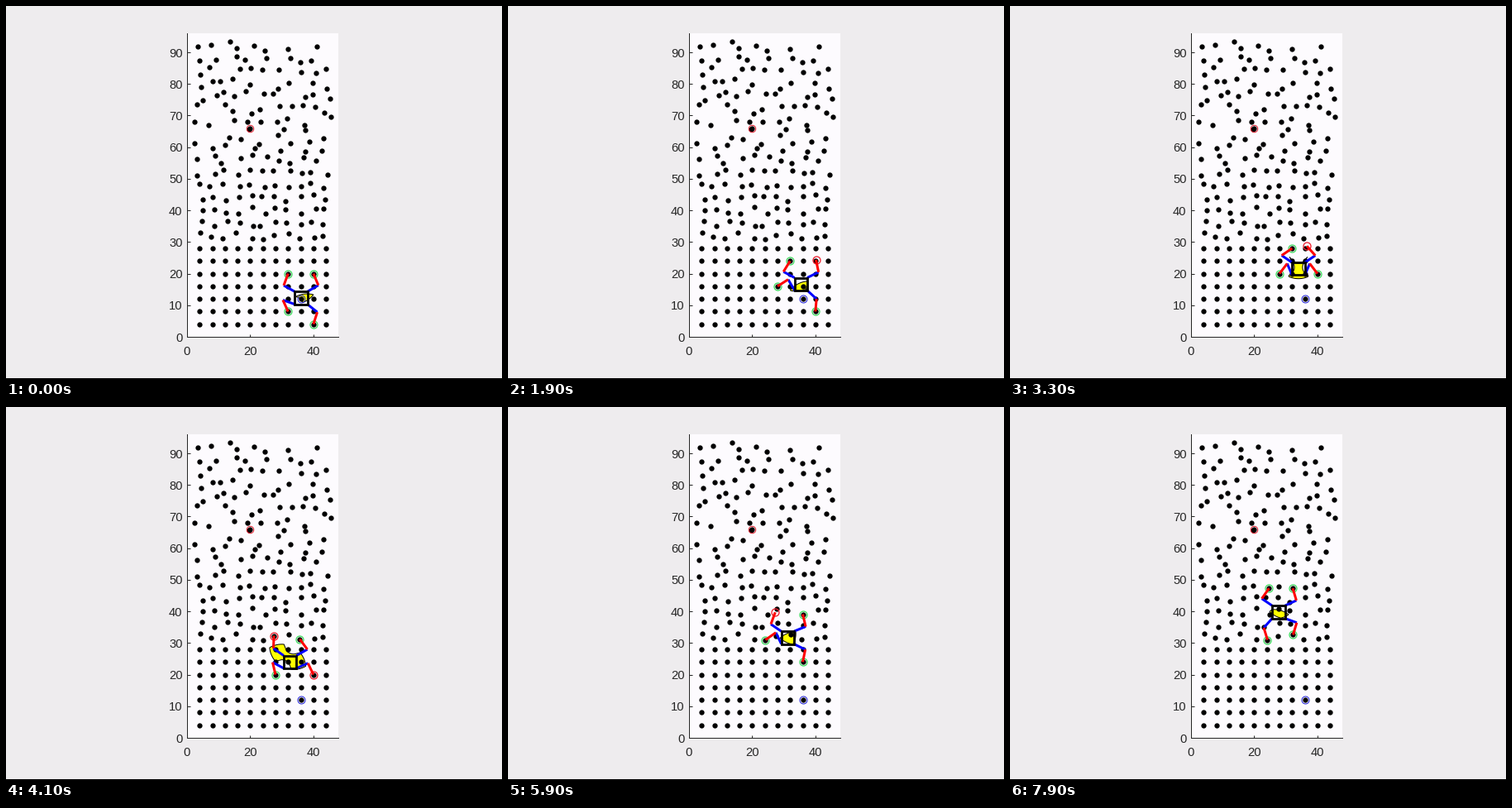
Animation of 600 by 451 pixels, one loop 8000 ms. Source, as a matplotlib script:

```python
import matplotlib.pyplot as plt
import numpy as np
from matplotlib.animation import FuncAnimation
from matplotlib.patches import Polygon, Rectangle

W, H, DPI = 600, 451, 100
FRAMES, INTERVAL = 80, 100
SCALE = 3.822             # pixels per wall unit
LINK = 4.0                # length of each leg link
HALF = 2.0                # half the body side
NEAR, FAR = 2.7, 7.6      # hip to foot distance a planted leg allows
INK, GREEN, RED = "#262626", "#40dc60", "#ee2030"
START, GOAL = (36, 12), (20, 66)

# Sides of each leg as (left/right, back/front) and the holds it visits
SIDES = {"LF": (-1, 1), "RF": (1, 1), "LB": (-1, -1), "RB": (1, -1)}
HOLDS = {
    "LF": [(32, 20), (32, 24), (32, 28), (27.5, 32.3), (28, 36.4),
           (27.7, 40.8), (27.4, 44.6), (24.7, 47.3)],
    "RF": [(40, 20), (40, 24), (40, 28), (35.7, 31.2), (36.1, 35.5),
           (36, 39.1), (36, 44.6), (32.2, 47.3)],
    "LB": [(32, 8), (28, 16), (28, 20), (24.2, 31)],
    "RB": [(40, 4), (40, 8), (40, 20), (36, 20), (36, 24), (35.7, 31.2),
           (32.3, 32.6)],
}

# Start time, time per swing, order of the legs
GAIT = [
    (0.8, 0.4, "RB"),
    (1.25, 0.21, "LB RF LF RF LF"),
    (2.3, 0.45, "RB LB RF LF"),
    (4.1, 0.283, "RB RF LF LB"),
    (5.24, 0.24, "RB RF LF RF LF RB"),
    (6.75, 0.33, "RF RB LF"),
]
SWINGS = {leg: [(t0 + k * dt, dt) for t0, dt, order in GAIT
                for k, name in enumerate(order.split()) if name == leg]
          for leg in SIDES}

# Time, body x, body y
BODY = np.array([
    (0, 36.1, 12.3), (0.8, 35.4, 14), (1.2, 35.4, 14), (2.5, 35.4, 19),
    (4.1, 32.6, 24), (5, 31.1, 27.4), (6.7, 31.3, 35.5), (7.9, 27.7, 39.8),
])


def pt(px):
    return px * 72 / DPI


def wall():
    """A grid of holds that gets rougher higher up."""
    rng = np.random.default_rng(7)
    grid = np.array([(x, y) for y in range(4, 93, 4) for x in range(4, 45, 4)],
                    float)
    y = grid[:, 1]
    rough = np.select([y <= 28, y <= 54], [0, 1.1], 1.7)[:, None]
    holds = grid + rough * rng.uniform(-1, 1, grid.shape)
    keep = (y < 56) | (rng.random(len(grid)) > 0.15)
    for hold in sum(HOLDS.values(), [GOAL]):
        i = np.argmin(np.hypot(*(grid - hold).T))
        holds[i], keep[i] = hold, True
    return np.vstack([holds[keep], np.subtract(GOAL, 0.45)])


def body_at(t):
    return np.array([np.interp(t, BODY[:, 0], BODY[:, k]) for k in (1, 2)])


def foot_at(leg, t):
    """Foot position and whether it is in the air."""
    holds = np.array(HOLDS[leg], float)
    for k, (t0, dt) in enumerate(SWINGS[leg]):
        p = (t - t0) / dt
        if p < -1e-6:
            return holds[k], False
        if p < 1:
            p = max(p, 0)
            ease = np.array([1 - (1 - p) ** 8, p])
            bow = np.array([0.6 * SIDES[leg][0] * np.sin(np.pi * p), 0])
            return holds[k] + ease * (holds[k + 1] - holds[k]) + bow, True
    return holds[-1], False


def knee_at(hip, foot, side, front):
    dx, dy = foot - hip
    dist = np.hypot(dx, dy)
    out = np.sqrt(max(LINK**2 - dist**2 / 4, 0))
    return (hip + foot) / 2 + side * front * out / dist * np.array([dy, -dx])


def region_from(centres, body):
    """Outline of the body positions every planted leg can reach."""
    spots = body + np.mgrid[-9:9.1:0.3, -9:9.1:0.3].reshape(2, -1).T
    dist = np.linalg.norm(spots[:, None] - centres, axis=2)
    free = spots[((dist > NEAR) & (dist < FAR)).all(axis=1)]
    if not len(free):
        return np.array([body])
    mid = free[np.argmin(np.linalg.norm(free - free.mean(axis=0), axis=1))]
    a = np.linspace(0, 2 * np.pi, 120, endpoint=False)
    rays = np.column_stack([np.cos(a), np.sin(a)])
    q = centres - mid
    along = rays @ q.T
    off = (q**2).sum(axis=1) - along**2
    leave = along + np.sqrt(np.maximum(FAR**2 - off, 0))
    enter = along - np.sqrt(np.maximum(NEAR**2 - off, 0))
    hit = (off < NEAR**2) & (along > 0)
    reach = np.minimum(leave, np.where(hit, enter, np.inf)).min(axis=1)
    return mid + rays * np.maximum(reach, 0)[:, None]


plt.rcParams["font.family"] = "Liberation Sans"
fig = plt.figure(figsize=(W / DPI, H / DPI), dpi=DPI, facecolor="#eeecee")
ax = fig.add_axes([219 / W, 51 / H, 48 * SCALE / W, 96 * SCALE / H])
ax.set(xlim=(0, 48), ylim=(0, 96), facecolor="#fdfbfe",
       xticks=range(0, 41, 20), yticks=range(0, 91, 10))
ax.spines[["top", "right"]].set_visible(False)
ax.spines[["left", "bottom"]].set(color=INK, linewidth=pt(1))
ax.tick_params(direction="in", length=pt(3.5), width=pt(1), color=INK,
               labelcolor=INK, labelsize=pt(14.7))
ax.tick_params(axis="x", pad=pt(11))
ax.tick_params(axis="y", pad=pt(5.5))
fig.add_artist(Rectangle((0, 0), 1, 1 / H, color="black", lw=0))


def ring(pos, size, color, width=1, z=7):
    return ax.plot(*[[v] for v in pos], "o", ms=pt(size), mfc="none",
                   mec=color, mew=pt(width), zorder=z)[0]


def bar(color):
    return ax.plot([], [], color=color, lw=pt(3), zorder=5,
                   solid_capstyle="butt")[0]


ax.plot(*wall().T, "o", ms=pt(6.3), color="black", mew=0, zorder=3)
ring(START, 9, "#2222dd")
ring(GOAL, 8.5, "#e02030")
region = ax.add_patch(Polygon([(0, 0)], fc="#ffff00", ec="black",
                              lw=pt(1), zorder=2))
torso = ax.add_patch(Rectangle((0, 0), 2 * HALF, 2 * HALF, fc="none",
                               ec="black", lw=pt(2.8), zorder=6))
legs = {leg: (bar("#0000ff"), bar("#ff0000"), ring((0, 0), 9, GREEN, 1.3, 4))
        for leg in SIDES}


def draw(i):
    t = i * INTERVAL / 1000
    body = body_at(t)
    torso.set_xy(body - HALF)
    centres = []
    for leg, (thigh, shin, grip) in legs.items():
        foot, moving = foot_at(leg, t)
        corner = HALF * np.array(SIDES[leg])
        hip = body + corner
        knee = knee_at(hip, foot, *SIDES[leg])
        thigh.set_data(*np.array([hip, knee]).T)
        shin.set_data(*np.array([knee, foot]).T)
        grip.set_data([foot[0]], [foot[1]])
        grip.set_markeredgecolor(RED if moving else GREEN)
        if not moving:
            centres.append(foot - corner)
    region.set_xy(region_from(np.array(centres), body))
    return []


anim = FuncAnimation(fig, draw, frames=FRAMES, interval=INTERVAL,
                     repeat=True, repeat_delay=0, blit=False)
plt.show()
```
